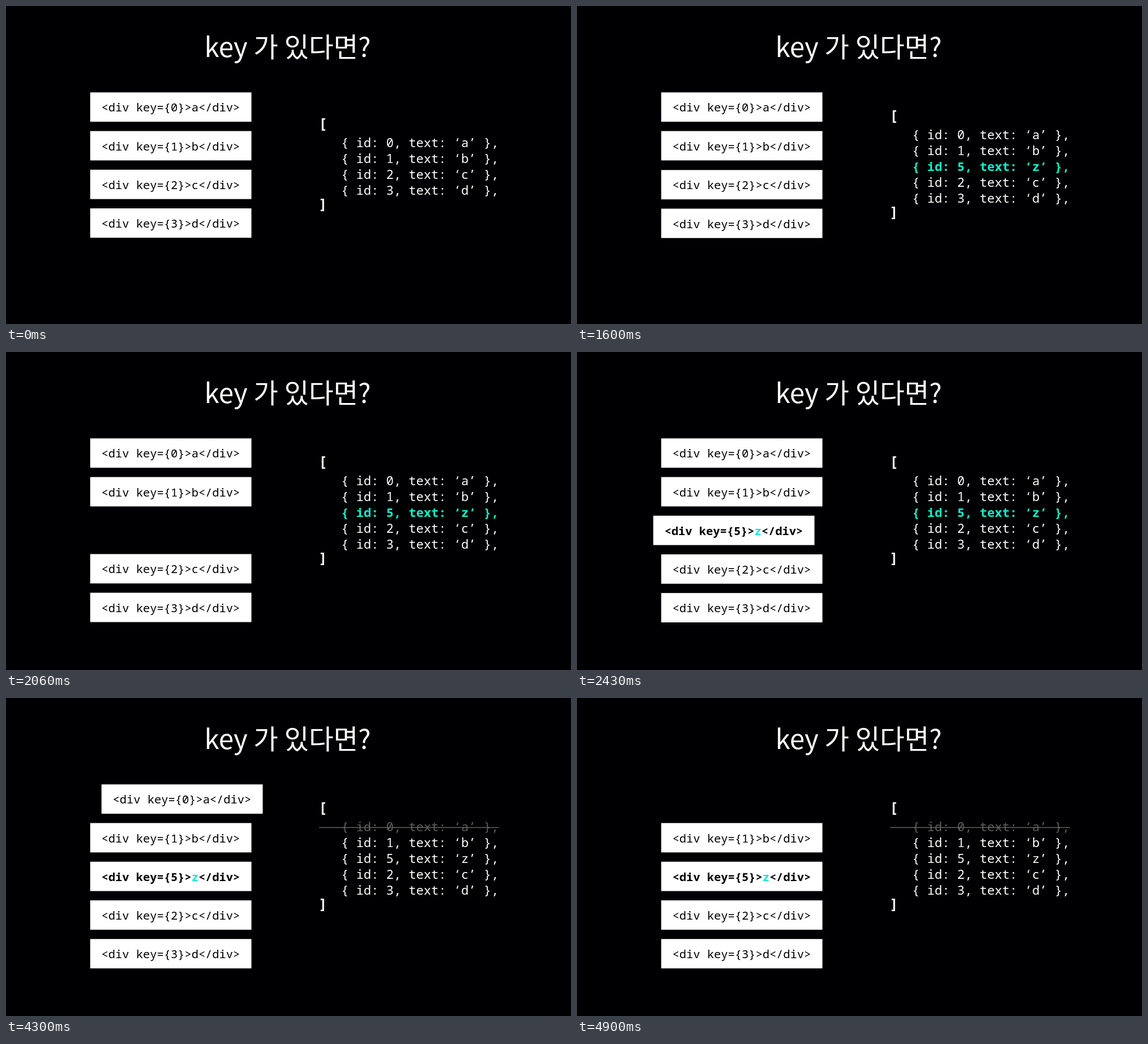
Write an HTML page with a canvas that moves like this. It is 998 by 561 pixels and loops after 5.93 s.

```html
<!DOCTYPE html>
<html lang="ko">
<head>
<meta charset="utf-8">
<title>key 가 있다면?</title>
<style>
html, body { margin: 0; width: 100%; height: 100%; overflow: hidden; background: #000002; }
canvas { display: block; }
</style>
</head>
<body>
<canvas id="stage" width="998" height="561"></canvas>
<script>
const ctx = document.getElementById("stage").getContext("2d");
const LOOP = 5930;
const MONO = '"Noto Sans Mono", "DejaVu Sans Mono", monospace';
const SANS = '"Noto Sans CJK KR", "Noto Sans CJK", "Noto Sans", sans-serif';
const BOX = { x: 148.7, y: 152.4, w: 284.8, h: 51.8, pitch: 68.2 };
const MASK_X = 102;
const LINE_H = 28;
const TEAL = "#12efcb";

function write(str, x, y, font, color) {
  ctx.font = font;
  ctx.fillStyle = color;
  ctx.fillText(str, x, y);
  return x + ctx.measureText(str).width;
}

// A box in the given row slot, shifted sideways by dx.
function drawBox(slot, key, letter, dx = 0, fresh = false) {
  const x = BOX.x + dx;
  const y = BOX.y + slot * BOX.pitch;
  const base = y + 34;
  const font = `${fresh ? 700 : 400} 20.4px ${MONO}`;
  ctx.save();
  ctx.beginPath();
  ctx.rect(MASK_X, 0, 998 - MASK_X, 561);
  ctx.clip();
  ctx.fillStyle = "#fff";
  ctx.fillRect(x, y, BOX.w, BOX.h);
  let pen = x + 19.9;
  pen = write(`<div key={${key}}>`, pen, base, font, "#000");
  pen = write(letter, pen, base, font, fresh ? "#16e5d3" : "#000");
  write("</div>", pen, base, font, "#000");
  ctx.restore();
}

function drawData(rows, top) {
  const bracket = `600 25px ${MONO}`;
  write("[", 552, top - 33.5, bracket, "#fff");
  rows.forEach(([id, letter, style], i) => {
    const color = { hot: TEAL, gone: "#5c5c5c" }[style] || "#fff";
    const font = `${style === "hot" ? 700 : 400} 22.08px ${MONO}`;
    const y = top + i * LINE_H;
    write(`{ id: ${id}, text: ‘${letter}’ },`, 592, y, font, color);
    if (style === "gone") {
      ctx.fillStyle = "#686868";
      ctx.fillRect(553, y - 7.2, 318, 1.4);
    }
  });
  write("]", 552.5, top + (rows.length - 1) * LINE_H + 24.5, bracket, "#fff");
}

function easeInOut(u) {
  u = Math.min(1, Math.max(0, u));
  return u < 0.5 ? 2 * u * u : 1 - 2 * (1 - u) ** 2;
}

// Sideways offset q ticks away from rest: a swing to the right, then a steady run left.
function swing(q, a, b, knee, speed) {
  if (q <= 0) return 0;
  const k = Math.min(q, knee);
  return a * k * k - b * k ** 3 - speed * (q - k);
}

function draw(ms) {
  const tick = Math.floor((ms + 7) * 0.03); // 30 steps per second
  const added = tick >= 21;
  const removed = tick >= 96;

  ctx.fillStyle = "#000002";
  ctx.fillRect(0, 0, 998, 561);
  write("key 가 있다면?", 350.5, 90, `500 47.3px ${SANS}`, "#fff");

  const rows = [[0, "a"], [1, "b"], [2, "c"], [3, "d"]];
  if (added) rows.splice(2, 0, [5, "z", removed ? "" : "hot"]);
  if (removed) rows[0].push("gone");
  drawData(rows, added ? 235 : 249);

  const drop = easeInOut((tick - 47) / 16);
  drawBox(0, 0, "a", swing(tick - 118, 0.68, 0.0468, 18, 26));
  drawBox(1, 1, "b");
  if (tick >= 66) drawBox(2, 5, "z", swing(79 - tick, 5.07, 0.91, 6, 42), true);
  drawBox(2 + drop, 2, "c");
  drawBox(3 + drop, 3, "d");
}

const start = performance.now();
function loop() {
  draw((performance.now() - start) % LOOP);
  requestAnimationFrame(loop);
}
loop();
</script>
</body>
</html>
```
